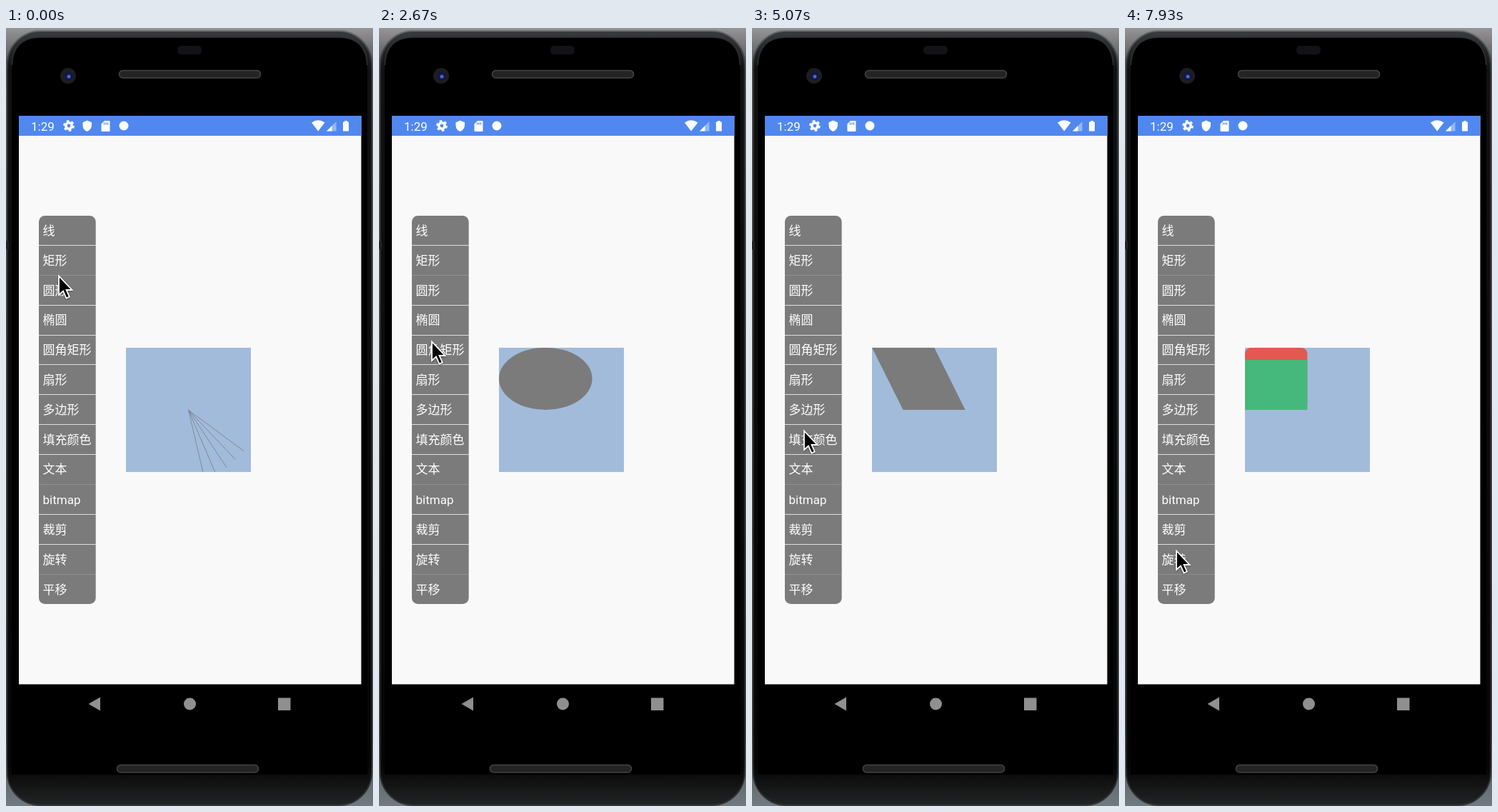
Recreate the animation shown at these times as an HTML page. Size 514 px wide and 1090 px high, loop 8 s.

```html
<!DOCTYPE html>
<html lang="zh">
<head>
<meta charset="utf-8">
<style>
html, body { margin: 0; width: 100%; height: 100%; overflow: hidden; background: #4a4d4f; }
svg { display: block; width: 100vw; height: 100vh; }
text { font-family: Roboto, "Noto Sans CJK SC", "Noto Sans CJK", sans-serif; font-size: 17px; fill: #fff; }
#shapes > g { visibility: hidden; }
</style>
</head>
<body>
<svg viewBox="0 0 514 1090" preserveAspectRatio="none">
  <defs>
    <linearGradient id="back" x2="0" y2="1">
      <stop offset="0" stop-color="#979497"/><stop offset=".04" stop-color="#5d5f61"/>
      <stop offset=".9" stop-color="#4a4d4f"/><stop offset="1" stop-color="#707a80"/>
    </linearGradient>
    <linearGradient id="body" x2="0" y2="1">
      <stop offset="0" stop-color="#3a3c3e"/><stop offset=".05" stop-color="#101112"/>
      <stop offset=".95" stop-color="#050505"/><stop offset="1" stop-color="#232425"/>
    </linearGradient>
    <linearGradient id="edge" x2="0" y2="1">
      <stop offset="0" stop-color="#6c6f71"/><stop offset=".05" stop-color="#2a2c2e"/>
      <stop offset=".94" stop-color="#1c1e20"/><stop offset="1" stop-color="#333638"/>
    </linearGradient>
    <clipPath id="view"><rect x="168" y="447.700" width="175" height="174.500"/></clipPath>
  </defs>

  <!-- phone body -->
  <rect width="514" height="1090" fill="url(#back)"/>
  <rect x="2" y="4" width="510" height="1085" rx="46" fill="url(#body)" stroke="url(#edge)" stroke-width="2"/>
  <path d="M8 1046V52Q10 14 46 13H468Q504 14 506 52V1046Z"/>
  <path d="M8 52Q10 14 46 13H468Q504 14 506 52" fill="none" stroke="#2f3133" stroke-width="1.500"/>
  <rect y="298" width="4" height="13" rx="2" fill="#222"/>
  <rect x="240" y="25" width="34" height="12" rx="5" fill="#121217"/>
  <g fill="#242424" stroke="#444" stroke-width="1.500">
    <rect x="158.500" y="59.500" width="198" height="10.500" rx="5"/>
    <rect x="155.500" y="1032.500" width="198" height="10.500" rx="5"/>
  </g>
  <circle cx="87" cy="67" r="11" fill="#1e1e20"/>
  <circle cx="87.500" cy="67.500" r="6" fill="#10184a"/>
  <circle cx="88" cy="68" r="2.500" fill="#5368bd"/>

  <!-- screen -->
  <rect x="18" y="123" width="479.500" height="796.500" fill="#f9f9f9"/>
  <rect x="18" y="123" width="479.500" height="28" fill="#5088f0"/>
  <text x="35" y="144">1:29</text>
  <g fill="#fff">
    <circle cx="88" cy="137" r="4.200" fill="none" stroke="#fff" stroke-width="3.600"/>
    <circle cx="88" cy="137" r="6.600" fill="none" stroke="#fff" stroke-width="2.600" stroke-dasharray="3.600 3.311"/>
    <path d="M113.500 129.500L120 132.300V137Q119 143 113.500 145Q108 143 107.500 137V132.300Z"/>
    <path d="M138 130H144.500Q145.500 130 145.500 131V144Q145.500 145 144.500 145H134.500Q133.500 145 133.500 144V134.500Z"/>
    <path d="M137.500 132.500V135.500M140 132.500V135.500M142.500 132.500V135.500" stroke="#5088f0" stroke-width="1.300"/>
    <circle cx="165" cy="137" r="6.500"/>
    <path d="M428 132.500Q437 126 446.500 132.500L437.200 144.500Z"/>
    <path d="M449 144.500L462.500 131V144.500Z" opacity=".4"/>
    <path d="M449 144.500L456.500 137V144.500Z"/>
    <path d="M472 131.500H474.300V130H477.700V131.500H480V144.500H472Z"/>
  </g>
  <g fill="#8f8f8f">
    <path d="M115.500 947L132 937.500V956.500Z"/>
    <circle cx="257.500" cy="947" r="8.500"/>
    <rect x="381" y="938.500" width="17.500" height="17.500"/>
  </g>

  <rect x="46" y="263" width="79.700" height="544" rx="8.500" fill="#7b7b7b"/>
  <g id="menu"></g>

  <g clip-path="url(#view)">
    <rect x="168" y="447.700" width="175" height="174.500" fill="#a2bbda"/>
    <g id="shapes" fill="#7b7b7b" transform="translate(168 447.700)"></g>
  </g>

  <path id="cursor" d="M-1 -1.500V25L5 19.500L9.500 29.500L13.800 27.500L9.500 18H17.500Z"
    fill="#000" stroke="#fff" stroke-width="1.800" style="filter:drop-shadow(0 1px 1px #0006)"/>
</svg>
<script>
const LOOP = 8000;
const $ = id => document.getElementById(id);

const labels = '线 矩形 圆形 椭圆 圆角矩形 扇形 多边形 填充颜色 文本 bitmap 裁剪 旋转 平移'.split(' ');
const latin = labels.indexOf('bitmap');
const faint = [2, 9, 12];
// the Latin row is one pixel taller than the others
$('menu').innerHTML = labels.map((label, i) => {
  const ruleY = Math.floor(262.85 + 41.8 * i + (i > latin)) + .5;
  const textY = Math.round(290 + 41.8 * i) + (i >= latin);
  const rule = i ? `<path d="M46 ${ruleY}H125.700" stroke="#fff" opacity="${faint.includes(i) ? .16 : .75}"/>` : '';
  return `${rule}<text x="51.500" y="${textY}">${label}</text>`;
}).join('');

// start time and drawing of each demo, in view coordinates
const demos = [
  [0, '<path d="M87.500 87.500L108 175M87.500 87.500L125 175M87.500 87.500L141 168M87.500 87.500L153 156.500M87.500 87.500L165 145" stroke="#777b88" stroke-width=".8"/>'],
  [470, '<rect width="87.300" height="87.300"/>'],
  [1330, '<circle cx="87.300" cy="87.300" r="43.600"/>'],
  [2130, '<ellipse cx="65.300" cy="43.600" rx="65.300" ry="43.600"/>'],
  [3000, '<rect width="130.600" height="87.300" rx="9"/>'],
  [3930, '<path d="M65.300 65.300L9 32.700A65.300 65.300 0 0 1 121.800 32.700Z"/>'],
  [4530, '<path d="M0 0H87.300L130.600 87.300H43.600Z"/>'],
  [5330, '<rect width="175" height="175" fill="#b4fefc"/>'],
  [6400, '<text y="87" style="font-size:15px;fill:#7b7b7b">你与你的远山</text>'],
  [7070, '<rect width="87.300" height="87.300" fill="#45b87c"/>'],
  [7600, '<rect width="87.300" height="87.300" rx="8.700" fill="#e45852"/><rect y="17.300" width="87.300" height="70" fill="#45b87c"/>']
];
$('shapes').innerHTML = demos.map(([, art]) => `<g>${art}</g>`).join('');
const groups = [...$('shapes').children];

// pointer: time, x, y
const route = [
  [0, 75, 349], [300, 65, 326], [800, 64, 325], [930, 65, 326], [1200, 73, 364],
  [1600, 73, 365], [1950, 74, 404], [2350, 74, 406], [2670, 75, 441], [2870, 75, 448],
  [3670, 75, 448], [3870, 74, 487], [4000, 74, 488], [4130, 74, 511], [4330, 74, 530],
  [4700, 74, 531], [5070, 74, 566], [5530, 74, 566], [5730, 74, 604], [6070, 74, 606],
  [6530, 74, 607], [6800, 74, 651], [7150, 74, 653], [7400, 74, 692], [7650, 74, 693],
  [7900, 73, 734], [LOOP, 73, 734]
];

function pointerAt(t) {
  const i = route.findIndex(p => p[0] > t);
  const [t0, x0, y0] = route[i - 1], [t1, x1, y1] = route[i];
  const u = (t - t0) / (t1 - t0), e = u * u * (3 - 2 * u);
  return [x0 + (x1 - x0) * e, y0 + (y1 - y0) * e];
}

function draw() {
  const t = performance.now() % LOOP;
  const active = demos.filter(([start]) => start <= t).length - 1;
  groups.forEach((g, i) => g.style.visibility = i === active ? 'visible' : 'hidden');
  $('cursor').setAttribute('transform', `translate(${pointerAt(t)})`);
  requestAnimationFrame(draw);
}
draw();
</script>
</body>
</html>
```
